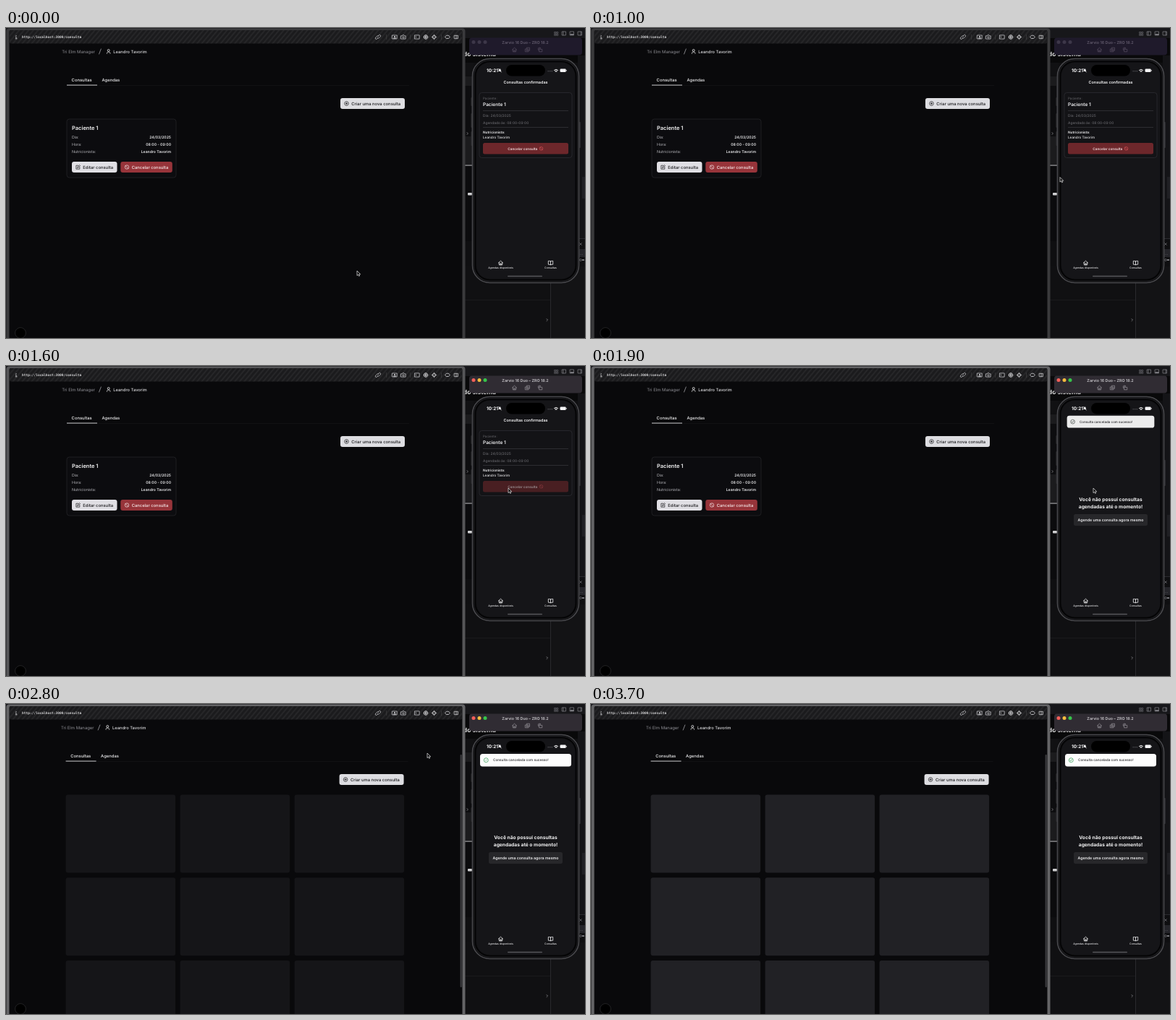
An HTML page for the animation above (4500 ms loop, 800x429 px).

```html
<!DOCTYPE html>
<html lang="pt">
<head>
<meta charset="utf-8">
<title>Consultas</title>
<style>
  html, body { margin: 0; width: 100%; height: 100%; overflow: hidden; background: #121215; }
  svg { display: block; width: 100vw; height: 100vh; }
  text { font-family: Inter, Roboto, sans-serif; text-rendering: geometricPrecision; white-space: pre; }
  .mono { font-family: "DejaVu Sans Mono", "Liberation Mono", monospace; }
</style>
</head>
<body>
<svg id="stage" viewBox="0 0 800 429" preserveAspectRatio="none"></svg>
<script>
const LOOP = 4500, STEP = 100, LAST = 3700;
const PERSON = 'Leandro Tavorim';

const rect = (x, y, w, h, fill, r = 0, more = '') =>
  `<rect x="${x}" y="${y}" width="${w}" height="${h}" rx="${r}" fill="${fill}" ${more}/>`;
const circle = (x, y, r, fill, more = '') =>
  `<circle cx="${x}" cy="${y}" r="${r}" fill="${fill}" ${more}/>`;
const stroke = (d, color, w = .8, more = '') =>
  `<path d="${d}" fill="none" stroke="${color}" stroke-width="${w}" stroke-linecap="round" stroke-linejoin="round" ${more}/>`;
const group = (body, more = '') => `<g ${more}>${body}</g>`;
const at = (x, y, body) => group(body, `transform="translate(${x} ${y})"`);
// y is the vertical middle of the line
const text = (x, y, size, str, fill, weight = 400, anchor = 'start', more = '') =>
  `<text x="${x}" y="${y + size * .36}" font-size="${size}" font-weight="${weight}" fill="${fill}" text-anchor="${anchor}" ${more}>${str}</text>`;
const mid = (x, y, size, str, fill, weight) => text(x, y, size, str, fill, weight, 'middle');
const end = (x, y, size, str, fill, weight) => text(x, y, size, str, fill, weight, 'end');

const icon = {
  home: c => stroke('M-3 0L0-2.8 3 0M-2.2-.6V2.8H2.2V-.6M-.6 2.8V.8H.6V2.8', c),
  book: c => stroke('M0-2C-1-2.6-2-2.6-3.2-2.6V2.2C-2 2.2-1 2.2 0 2.8 1 2.2 2 2.2 3.2 2.2V-2.6C2-2.6 1-2.6 0-2ZV2.6', c),
  user: c => stroke('M-2.2 3V2.2C-2.2.3 2.2.3 2.2 2.2V3', c) + circle(0, -1.3, 1.5, 'none', `stroke="${c}" stroke-width=".8"`),
  plus: c => circle(0, 0, 2.8, 'none', `stroke="${c}" stroke-width=".7"`) + stroke('M-1.3 0H1.3M0-1.3V1.3', c, .7),
  ban: c => circle(0, 0, 2.7, 'none', `stroke="${c}" stroke-width=".7"`) + stroke('M-1.9-1.9L1.9 1.9', c, .7),
  edit: c => stroke('M0-2.3H-2.6V2.7H2.3V0M-.8.9L-.5-.5 2-3 3-2 .6.5Z', c, .7),
  panel: c => stroke('M-2.4-2.2H2.4V2.2H-2.4ZM0-2.2V2.2', c, .8)
};

function backdrop() {
  const c = '#77777c';
  return rect(0, 0, 800, 429, '#0f0f11') +
    rect(634, 0, 166, 14, '#17171a') +
    rect(634, 14, 166, 34, '#09090a') +
    end(677, 36, 8.5, 'do sistema', '#dededf', 700) +
    rect(634, 48, 12, 18, '#111113') + rect(634, 67, 12, 123, '#1b1b1d') +
    rect(634, 80, 9, 70, '#0d0d0f') + rect(634, 189.5, 12, 1.2, '#a0a0a3') +
    rect(634, 191, 12, 104, '#0b0b0d') + rect(638, 228, 6, 3.6, '#d0d0d2', 1) +
    stroke('M637 144.5l1.4 1.5-1.4 1.5', '#929296', .7) +
    rect(790, 38, 10, 254, '#141417') + rect(790, 291, 10, 1, '#2b2b2f') +
    rect(796, 206, 4, 30, '#202024') +
    stroke('M792.6 297.6l2.8 2.8m0-2.8l-2.8 2.8', c, .7) +
    rect(791, 306, 9, 11, '#25252a') + mid(795, 312, 5, '...', c, 600) +
    circle(794, 321, 1.4, 'none', `stroke="${c}" stroke-width=".7"`) + rect(796, 320, 3, 2, c) +
    rect(634, 330, 118, 99, '#101012') + rect(753, 330, 47, 99, '#131315') +
    rect(634, 376, 119, .8, '#1d1d20') + rect(752, 345, 1, 84, '#29292c') +
    stroke('M747 402.5l1.5 1.5-1.5 1.5', '#9a9a9e', .7) +
    stroke('M758 5.5h1.8v1.8H758zM761 5.5h1.8v1.8H761zM758 8.5h1.8v1.8H758zM761 8.5h1.8v1.8H761z', c, .6) +
    at(771, 7.5, stroke('M-2.5-2.5H2.5V2.5H-2.5ZM-1-2.5V2.5', c)) +
    at(782, 7.5, stroke('M-2.5-2.5H2.5V2.5H-2.5Z', c) + rect(-2.5, .5, 5, 2, c)) +
    at(793, 7.5, stroke('M-2.5-2.5H2.5V2.5H-2.5ZM1-2.5V2.5', c));
}

function toolbar() {
  const c = '#c9c9cc', w = .75;
  return `<defs><pattern id="hatch" width="5" height="5" patternUnits="userSpaceOnUse" patternTransform="rotate(40)">
    <rect width="5" height="5" fill="#1b1b1d"/><rect width="2" height="5" fill="#262628"/></pattern></defs>` +
    rect(5, 3, 625, 18.5, 'url(#hatch)', 2) +
    circle(14, 10.6, .7, c) + stroke('M13.3 12.3h.8v2.5m-1 0h2', c, .8) +
    text(22, 12.7, 4.55, 'http://localhost:3000/consulta', '#d6d6d8', 700, 'start', 'class="mono"') +
    at(514, 12.5, stroke('M-.3 1.6l-1 1a1.4 1.4 0 0 1-2-2l1.8-1.8a1.4 1.4 0 0 1 2 0M.3-1.6l1-1a1.4 1.4 0 0 1 2 2L1.500 1.200a1.4 1.4 0 0 1-2 0', c, w)) +
    at(537, 12.5, stroke('M-3.2-2.5H3.200V2.500H-3.2Z', c, w) + circle(0, -.5, 1.1, c) + rect(-1.8, 1, 3.6, 1.3, c)) +
    at(549, 12.5, stroke('M-3.2-1.7H-1.6L-1-2.700H1L1.6-1.700H3.2V2.600H-3.2Z', c, w) + circle(0, .4, 1.2, 'none', `stroke="${c}" stroke-width=".7"`)) +
    at(568, 12.5, stroke('M-3.2-2.600H3.2V2.600H-3.2ZM-2-1l1 1-1 1', c, w)) +
    at(580, 12.5, circle(0, 0, 2.7, 'none', `stroke="${c}" stroke-width="1"`) + circle(0, 0, 1.2, c) + stroke('M0-3V3M-3 0H3', c, .6)) +
    at(591.5, 12.5, circle(0, 0, 2.3, 'none', `stroke="${c}" stroke-width=".8"`) + stroke('M0-3.300V-1.200M0 1.200V3.300M-3.300 0H-1.200M1.200 0H3.300', c, .8)) +
    at(610, 12.5, stroke('M-1.500-2L-3.600 0-1.500 2H1.500L3.600 0 1.500-2Z', c, .9)) +
    at(622, 12.5, icon.panel(c)) +
    [525.5, 558.5, 601].map(x => rect(x, 9, .6, 7, '#48484b')).join('');
}

function card() {
  const row = (y, label, value) =>
    text(91, y, 5.3, label, '#b4b4b9') + end(228, y, 5.1, value, '#ececee', 600);
  return rect(84, 126, 151, 81, '#0c0c0f', 3.5, 'stroke="#242428" stroke-width=".8"') +
    text(91, 138.7, 7.5, 'Paciente 1', '#f4f4f5', 600) +
    row(151.2, 'Dia:', '24/03/2025') + row(161.2, 'Hora:', '08:00 - 09:00') + row(171.2, 'Nutricionista:', PERSON) +
    rect(91, 185, 62.5, 15, '#e0dfe4', 3) + at(99.5, 192.5, icon.edit('#18181b')) +
    text(106.3, 192.5, 5.85, 'Editar consulta', '#18181b', 500) +
    rect(158.3, 185, 71.5, 15, '#97343a', 3) + at(167, 192.5, icon.ban('#f4e6e7')) +
    text(173.7, 192.5, 5.85, 'Cancelar consulta', '#f8eeee', 500);
}

function skeletons(level) {
  let out = '';
  for (let i = 0; i < 9; i++)
    out += rect(84 + i % 3 * 158, 125.5 + Math.floor(i / 3) * 114.8, 151.5, 108, '#222226', 3);
  return group(out, `opacity="${level}"`);
}

function browser(edge, loading, level) {
  const page = text(77.3, 32.5, 5.95, 'Tri Elm Manager', '#8e8e94') +
    stroke('M128.600 36L131.300 29', '#a1a1a6', .8) +
    at(141.7, 32.3, icon.user('#e6e6e8')) +
    text(148.3, 32.5, 5.8, PERSON, '#dcdcdf', 500) +
    rect(84, 79, 473, .6, '#17171a') +
    text(90.6, 72.2, 5.85, 'Consultas', '#f4f4f5', 500) +
    text(132.5, 72.2, 5.85, 'Agendas', '#f0f0f2', 500) +
    rect(84, 78.6, 42, .9, '#dedee0') +
    rect(462, 97, 89, 15, '#dddde1', 3) + at(470.5, 104.5, icon.plus('#18181b')) +
    text(477.3, 104.5, 5.85, 'Criar uma nova consulta', '#18181b', 500) +
    (loading ? skeletons(level) : card());
  return rect(0, 0, 634, 440, '#141418') + rect(.5, .5, 634, 440, edge, 4) +
    rect(4.5, 3, 626, 430, '#09090b', 2) + toolbar() +
    at(loading ? -1.4 : 0, 0, page) +
    (loading ? rect(627.6, 70, 2.2, 322, '#3b3b3e', 1) : '') +
    circle(20, 422, 7.4, '#000', 'stroke="#2a2a2d" stroke-width=".8"');
}

function simulatorBar(active) {
  const c = active ? '#8b888e' : '#514a5c';
  const lights = active ? ['#f4605a', '#f5bd3e', '#36c64a'] : Array(3).fill('#3d3749');
  return rect(640, 13.5, 156, 24, active ? '#302c33' : '#1f1a2b', 4) +
    lights.map((f, i) => circle(646 + i * 8, 19.5, 2.5, f)).join('') +
    mid(717.5, 19.7, 5.4, 'Zarvio 16 Duo – ZRO 18.2', active ? '#c8c6ca' : '#625b6d', 600) +
    at(702.5, 30, icon.home(c)) +
    at(720.5, 30, stroke('M-2.800-1H1.400V2.800H-2.800ZM-1.200-1V-2.800H3V1.200H1.400M-.7 0V1.800M-1.600.9H.2', c)) +
    at(738, 30, stroke('M-1-.6H2.800V2.800H-1ZM-2.600.4V-2.200H.4M-.6-3.200L.4-2.200-.6-1.200', c));
}

function booking(dim) {
  const left = (y, size, str, fill, weight) => text(659, y, size, str, fill, weight);
  const button = rect(659, 159, 118, 15.5, '#6d272b', 2.5) +
    mid(713.8, 166.9, 4.7, 'Cancelar consulta', '#f1dfe0', 600) +
    at(739.5, 166.8, group(icon.ban('#e2585e'), 'transform="scale(.85)"'));
  return mid(718, 74.6, 5.45, 'Consultas confirmadas', '#f4f4f5', 600) +
    rect(654, 89.5, 128, 90, '#131316', 3.5, 'stroke="#2d2d31" stroke-width=".8"') +
    left(97.2, 4.5, 'Paciente:', '#65656a') + left(105.2, 6.5, 'Paciente 1', '#f0f0f2', 600) +
    rect(659, 114.3, 118, .7, '#39393d') +
    left(121.6, 4.95, 'Dia: 24/03/2025', '#66666b', 500) +
    left(131, 4.85, 'Agendado às: 08:00-09:00', '#66666b', 500) +
    rect(659, 137.3, 118, .7, '#39393d') +
    left(144.2, 4.7, 'Nutricionista:', '#efeff1', 600) + left(151.4, 4.65, PERSON, '#e8e8ea', 500) +
    group(button, `opacity="${dim}"`);
}

const empty = () =>
  mid(718, 184.5, 6.7, 'Você não possui consultas', '#f4f4f5', 700) +
  mid(718, 194.3, 6.7, 'agendadas até o momento!', '#f4f4f5', 700) +
  rect(667, 205, 102, 16, '#27272a', 2.5) +
  mid(718, 213, 5.25, 'Agende uma consulta agora mesmo', '#f0f0f2', 600);

function toast(show, check) {
  const c = show < 1 ? '#555c58' : '#43a463';
  const body = rect(-63, -8.8, 126, 17.6, '#fdfdfd', 3.5) +
    at(-54.7, 0, circle(0, 0, 3, 'none', `stroke="${c}" stroke-width=".8"`) +
      group(stroke('M-1.400.1L-.4 1.200 1.500-1.200', c, .8), `transform="scale(${check})"`)) +
    text(-45, 0, 4.7, 'Consulta cancelada com sucesso!', '#27272a', 500);
  return group(body, `transform="translate(718 ${77.7 - (1 - show) * 8}) scale(${.4 + .6 * show})" opacity="${show}"`);
}

function phone(s) {
  const w = '#f4f4f5';
  return rect(791, 130, 3, 36, '#2c2c30', 1) + rect(642.5, 96, 2.5, 12, '#2c2c30', 1) +
    rect(642.5, 118, 2.5, 20, '#2c2c30', 1) + rect(642.5, 143, 2.5, 20, '#2c2c30', 1) +
    rect(644.5, 42.5, 147, 310, '#050506', 24, 'stroke="#4a4a4e" stroke-width="1.6"') +
    rect(646.6, 44.6, 142.8, 305.800, 'none', 22, 'stroke="#1f1f22" stroke-width="1.200"') +
    rect(649.5, 47.5, 137, 300, '#151518', 19) +
    rect(691, 51, 54, 15.5, '#000', 7.75) +
    text(664, 58.8, 6.4, '10:21', w, 700) +
    at(682.3, 58.6, `<path d="M-2 1.300Q-1.300.5-1.300-.8A1.300 1.300 0 0 1 1.300-.8Q1.300.5 2 1.300Z" fill="${w}"/>` + stroke('M-2-2.200L2 2.500', w, .7)) +
    [749, 750.9, 752.8, 754.7].map(x => circle(x, 59.7, .5, '#85858a')).join('') +
    at(760, 59, stroke('M-2.600-.6A3.700 3.700 0 0 1 2.600-.6M-1.400.7A2 2 0 0 1 1.400.7', w, 1) + circle(0, 1.600, .6, w)) +
    rect(765.5, 56.5, 8.2, 4.600, w, 1.3) + rect(774.2, 58, .7, 1.6, w) +
    (s.empty ? empty() : booking(s.dim)) +
    (s.toast ? toast(s.toast, s.check) : '') +
    at(683.5, 325, icon.home(w)) + mid(683.5, 332.2, 3.5, 'Agendas disponíveis', '#e6e6e8', 500) +
    at(752.5, 325, icon.book(w)) + mid(752.5, 332.2, 3.5, 'Consultas', '#e6e6e8', 500) +
    rect(693, 342.8, 48, 1.5, '#56565a', .75);
}

// time, x, y of the pointer tip
const pointer = [
  [0, 485, 336], [600, 485, 336], [700, 525, 306.5], [900, 612, 236], [1100, 684, 177],
  [1200, 694, 169], [2500, 694, 169], [2600, 680, 156], [2800, 582, 68], [2900, 588, 39],
  [3000, 597, 14], [3100, 597, 14], [3300, 600, 6], [3500, 606, -14]
];
const border = [[0, 58], [1400, 58], [1700, 100]];
const toastIn = [[1700, 0], [1800, .5], [1900, .93], [2000, 1]];
const tick = [[2400, 1], [2700, .7], [3100, .7], [3500, 1]];

function sample(table, t) {
  const i = table.findIndex(k => k[0] > t);
  if (i < 0) return table[table.length - 1].slice(1);
  if (!i) return table[0].slice(1);
  const a = table[i - 1], b = table[i], p = (t - a[0]) / (b[0] - a[0]);
  return a.slice(1).map((v, n) => v + (b[n + 1] - v) * p);
}

function render(t) {
  const [x, y] = sample(pointer, t), [g] = sample(border, t);
  const level = .74 + .26 * Math.cos((t - 1950) / 1800 * 2 * Math.PI);
  stage.innerHTML = backdrop() +
    browser(`rgb(${g},${g},${g + 2})`, t >= 2000, level.toFixed(3)) +
    simulatorBar(t >= 1300) +
    phone({ empty: t >= 1700, dim: t >= 1500 ? .6 : 1, toast: sample(toastIn, t)[0], check: sample(tick, t)[0] }) +
    at(x, y, `<path d="M0 0V6.600L1.600 5.200 2.600 7.400 3.700 6.900 2.700 4.800H4.700Z" fill="#060606" stroke="#e8e8ea" stroke-width=".7"/>`);
}

const stage = document.getElementById('stage');
let shown = -1;
const start = performance.now();
function frame() {
  const t = Math.min(Math.floor((performance.now() - start) % LOOP / STEP) * STEP, LAST);
  if (t !== shown) render(shown = t);
  requestAnimationFrame(frame);
}
frame();
</script>
</body>
</html>
```
